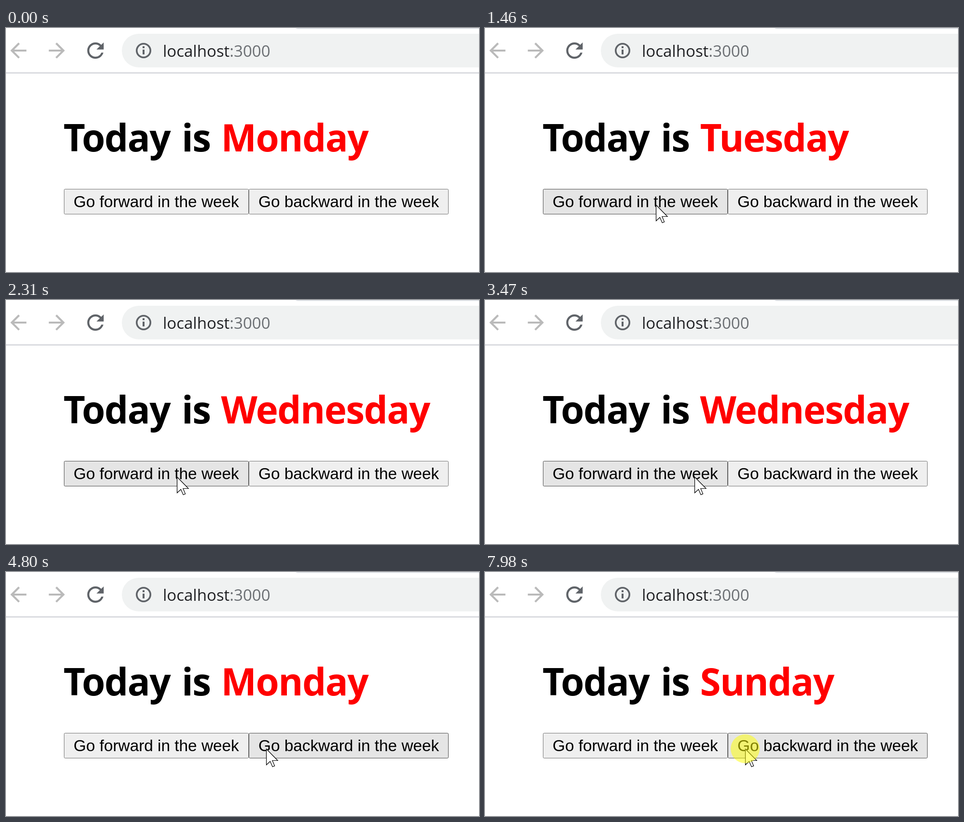
An HTML page that plays this animation: 980 px wide and 508 px high, repeating every 8000 ms.

```html
<!DOCTYPE html>
<html lang="en">
<head>
<meta charset="utf-8">
<title>Day of the week</title>
<style>
  html, body { margin: 0; width: 100%; height: 100%; overflow: hidden; background: #fff; }
  svg { display: block; }
  .url { font: 33px "Open Sans", "Noto Sans", sans-serif; fill: #202124; }
  .heading { font: bold 78px "Open Sans", "Noto Sans", sans-serif; letter-spacing: -.02em; }
  .button text { font: 33.333px "Liberation Sans", Arial, sans-serif; }
  .button rect { fill: #efefef; stroke: #767676; }
  .button.hover rect { fill: #e5e5e5; stroke: #4f4f4f; }
  .button.active rect { fill: #f5f5f5; stroke: #8d8d8d; }
</style>
</head>
<body>
<svg width="980" height="508" viewBox="0 0 980 508">
  <defs>
    <path id="arrow" d="M20 11H7.83l5.59-5.59L12 4l-8 8 8 8 1.41-1.41L7.83 13H20z"/>
  </defs>

  <!-- Browser bar -->
  <path d="M600 0H980V2H605Q602 2 600 0" fill="#dee1e6"/>
  <rect x="240" y="12" width="800" height="70" rx="35" fill="#f0f2f2"/>
  <rect y="92" width="980" height="3" fill="#dadce0"/>
  <g fill="#bababa">
    <use href="#arrow" transform="translate(.7 22) scale(2.08)"/>
    <use href="#arrow" transform="translate(130.3 22) scale(-2.08 2.08)"/>
  </g>
  <path transform="translate(159.8 21.4) scale(2.13)" fill="#5f6368"
    d="M17.65 6.35C16.2 4.9 14.21 4 12 4c-4.42 0-7.99 3.58-7.99 8s3.57 8 7.99 8c3.73 0 6.84-2.55 7.73-6h-2.08c-.82 2.33-3.04 4-5.65 4-3.31 0-6-2.69-6-6s2.69-6 6-6c1.66 0 3.14.69 4.22 1.78L13 11h7V4z"/>
  <circle cx="285" cy="47" r="14.2" fill="none" stroke="#5f6368" stroke-width="3.6"/>
  <path d="M283 38h4v4h-4zM283 45h4v10h-4z" fill="#5f6368"/>
  <text class="url" x="325" y="60">localhost<tspan fill="#6b6f73">:3000</tspan></text>

  <!-- Page -->
  <text class="heading" y="257"><tspan x="119">Today </tspan><tspan x="364">is </tspan><tspan id="day" x="445.5" fill="#f00">Monday</tspan></text>
  <g class="button" id="forward">
    <rect x="120.5" y="335.5" width="382" height="52" rx="2"/>
    <text x="140" y="373">Go forward in the week</text>
  </g>
  <g class="button" id="backward">
    <rect x="503.5" y="335.5" width="413" height="52" rx="2"/>
    <text x="523" y="373">Go backward in the week</text>
  </g>

  <g id="pointer">
    <path d="M.5 .5V33.5L8.3 26.2 13.2 37.5 17.6 35.6 12.9 24.5H24z" fill="#fff" stroke="#000" stroke-width="1.2"/>
    <circle id="halo" r="30" fill="#ff0" opacity=".5"/>
  </g>
</svg>
<script>
const LOOP = 8000;

// Each list holds [start in ms, value...]; a value stays until the next start.
const days = [[0, "Monday"], [1460, "Tuesday"], [2310, "Wednesday"],
  [4020, "Tuesday"], [4800, "Monday"], [7280, "Sunday"]];
const positions = [[0, 434, 600], [360, 434, 488], [440, 408, 450], [520, 385, 420],
  [590, 368, 400], [670, 359, 388], [840, 356, 377], [910, 354, 368],
  [3470, 434, 368], [3540, 514, 368], [3620, 539, 368]];
const halos = [[0, false], [1310, true], [1460, false], [2230, true], [2310, false],
  [4720, true], [4800, false], [7200, true], [7280, false], [7980, true]];
const presses = [[0, false], [1390, true], [1460, false], [2230, true], [2310, false],
  [4720, true], [4800, false], [7200, true], [7280, false]];

const at = (steps, time) => steps.findLast(([start]) => start <= time).slice(1);
const $ = id => document.getElementById(id);
const day = $("day"), pointer = $("pointer"), halo = $("halo");
const buttons = [
  { node: $("forward"), left: 120, right: 503 },
  { node: $("backward"), left: 503, right: 917 }
];

function draw(time) {
  const [x, y] = at(positions, time);
  const [pressed] = at(presses, time);
  day.textContent = at(days, time)[0];
  pointer.setAttribute("transform", `translate(${x} ${y})`);
  halo.setAttribute("visibility", at(halos, time)[0] ? "visible" : "hidden");
  for (const { node, left, right } of buttons) {
    const over = x >= left && x < right && y >= 335 && y < 388;
    node.classList.toggle("hover", over && !pressed);
    node.classList.toggle("active", over && pressed);
  }
}

function tick() {
  draw(performance.now() % LOOP);
  requestAnimationFrame(tick);
}
tick();
</script>
</body>
</html>
```
